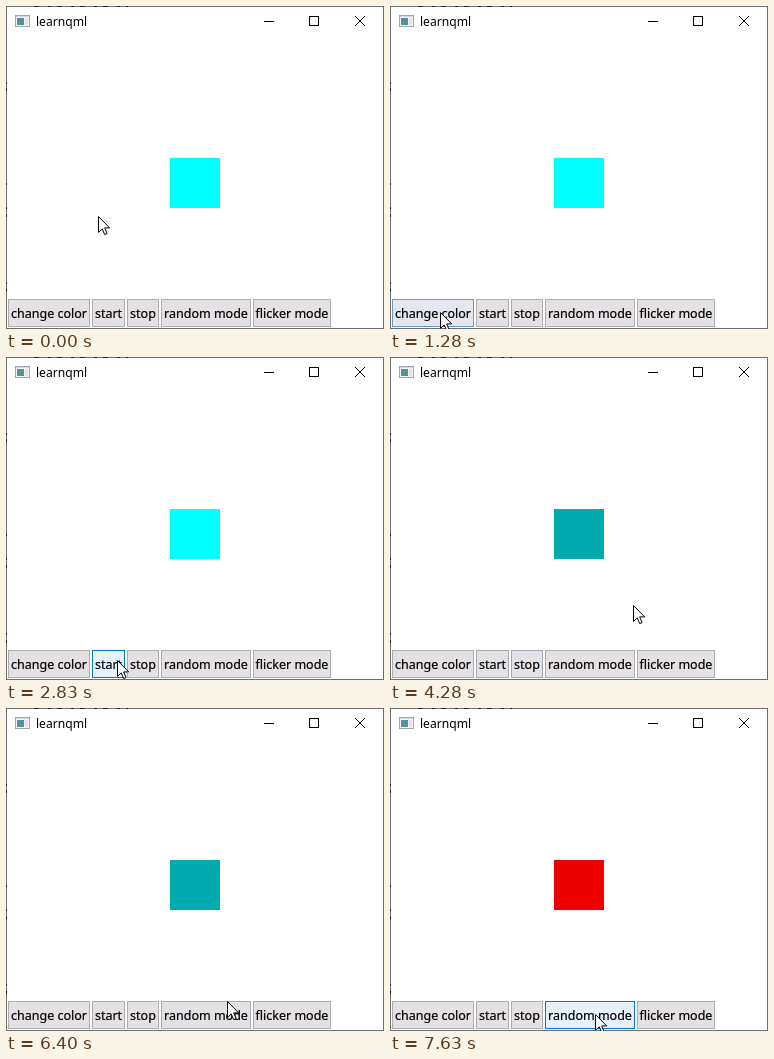
These frames come from a looping animation (378 by 323 pixels, 8 s). An HTML page:

```html
<!DOCTYPE html>
<html lang="en">
<head>
<meta charset="utf-8">
<title>learnqml</title>
<style>
  html, body { margin: 0; width: 100%; height: 100%; overflow: hidden; background: #fff; }
  svg { display: block; width: 378px; height: 323px; }
  text { font-family: "Noto Sans", "Open Sans", sans-serif; fill: #000; }
  .label { font-size: 12.5px; stroke: #000; stroke-width: .2px; }
  .crisp { shape-rendering: crispEdges; }
</style>
</head>
<body>
<svg viewBox="0 0 378 323">
  <defs>
    <linearGradient id="screen" x2="0" y2="1">
      <stop offset="0" stop-color="#5b87b4"/>
      <stop offset="1" stop-color="#4f9a7d"/>
    </linearGradient>
  </defs>
  <rect width="378" height="323" fill="#fff"/>
  <rect class="crisp" x=".5" y=".5" width="377" height="322" fill="none" stroke="#6e6e6e"/>
  <g class="crisp" stroke="#222">
    <path d="M28 .5h94" stroke-dasharray="5 9 3 6"/>
    <path d="M.5 76v2M.5 82v3M.5 177v2M.5 201v2M.5 208v3M.5 276v2M.5 283v3"/>
  </g>

  <g id="icon" class="crisp">
    <rect x="9.5" y="9.5" width="14" height="11" fill="#f5f5f5" stroke="#a0a5aa"/>
    <rect x="10" y="10" width="13" height="1" fill="#d3d8dd"/>
    <rect x="11" y="12" width="7" height="7" fill="url(#screen)"/>
    <rect x="19" y="12" width="3" height="7" fill="#dfe3e6"/>
  </g>
  <text x="30" y="20" font-size="12.1">learnqml</text>
  <g fill="none" stroke="#000">
    <path class="crisp" d="M258 15.5h10"/>
    <rect class="crisp" x="303.5" y="10.5" width="9" height="9"/>
    <path d="M349 10l10 10M359 10l-10 10"/>
  </g>

  <rect id="square" class="crisp" x="164" y="152" width="50" height="50"/>
  <g id="buttons"></g>
  <path id="cursor" d="M.5 .6V16.4L4.2 12.9 6.7 18.6 9.1 17.6 6.7 11.9H11.7Z" fill="#fff" stroke="#000"/>
</svg>
<script>
const DURATION = 8000;
const FADE = 350;
const START_CLICK = 2630;
const RANDOM_CLICK = 7100;
const TOP = 293;
const $ = id => document.getElementById(id);

// The pointer rests between these eased moves
const home = { x: 92, y: 210 };
const moves = [
  { from: 130, to: 660, x: 80, y: 235 },
  { from: 800, to: 1280, x: 50, y: 306 },
  { from: 1630, to: 2150, x: 111, y: 303 },
  { from: 3910, to: 4280, x: 243, y: 248 },
  { from: 4280, to: 5080, x: 233, y: 281 },
  { from: 5880, to: 6400, x: 221, y: 293 },
  { from: 6400, to: 6800, x: 205, y: 306 }
];

const buttons = [
  { label: "change color", w: 82 },
  { label: "start", w: 33 },
  { label: "stop", w: 32 },
  { label: "random mode", w: 90 },
  { label: "flicker mode", w: 78 }
];

// Idle, hovered and pressed looks
const fills = [[228, 224, 228], [229, 241, 251], [204, 228, 247]];
const borders = [[173, 173, 173], [0, 120, 215], [0, 84, 153]];

function add(parent, tag, attrs) {
  const node = document.createElementNS("http://www.w3.org/2000/svg", tag);
  for (const key in attrs) node.setAttribute(key, attrs[key]);
  return parent.appendChild(node);
}

let left = 2;
for (const b of buttons) {
  b.x = left;
  left += b.w + 2;
  b.rect = add($("buttons"), "rect", { class: "crisp", x: b.x + .5, y: TOP + .5, width: b.w - 1, height: 27 });
  add($("buttons"), "text", { class: "label", x: b.x + b.w / 2, y: 312, "text-anchor": "middle" }).textContent = b.label;
}

const clamp = v => Math.max(0, Math.min(1, v));
const ease = k => k * k * (3 - 2 * k);
const mix = (a, b, k) => a + (b - a) * k;

function pointer(t) {
  return moves.reduce((p, m) => {
    const k = ease(clamp((t - m.from) / (m.to - m.from)));
    return { x: mix(p.x, m.x, k), y: mix(p.y, m.y, k) };
  }, home);
}

function isOver(b, t) {
  const p = pointer(t);
  return p.y >= TOP && p.x >= b.x && p.x < b.x + b.w;
}

// Hover fades as the share of the recent past spent over the button
function hover(b, t) {
  const steps = 20;
  let hits = 0;
  for (let i = 0; i < steps; i++) hits += isOver(b, t - FADE * i / steps);
  return hits / steps;
}

function press(t) {
  return Math.max(...[START_CLICK, RANDOM_CLICK].map(click => clamp(1.2 - Math.abs(t - click) / 100)));
}

function shade(palette, level) {
  const i = Math.min(1, Math.floor(level));
  return `rgb(${palette[i].map((v, c) => Math.round(mix(v, palette[i + 1][c], level - i)))})`;
}

// A one second timer flickers the square, then picks a random colour
function squareColor(t) {
  const ticks = Math.max(0, Math.floor((t - START_CLICK) / 1000));
  if (START_CLICK + ticks * 1000 > RANDOM_CLICK) return "#ee0000";
  return ticks % 2 ? "#00abaf" : "#00ffff";
}

function render(t) {
  const p = pointer(t);
  $("cursor").setAttribute("transform", `translate(${Math.round(p.x)} ${Math.round(p.y)})`);
  $("square").setAttribute("fill", squareColor(t));
  for (const b of buttons) {
    const level = hover(b, t) + (isOver(b, t) ? press(t) : 0);
    b.rect.setAttribute("fill", shade(fills, level));
    b.rect.setAttribute("stroke", shade(borders, level));
  }
}

const start = performance.now();
function tick() {
  render((performance.now() - start) % DURATION);
  requestAnimationFrame(tick);
}
tick();
</script>
</body>
</html>
```
